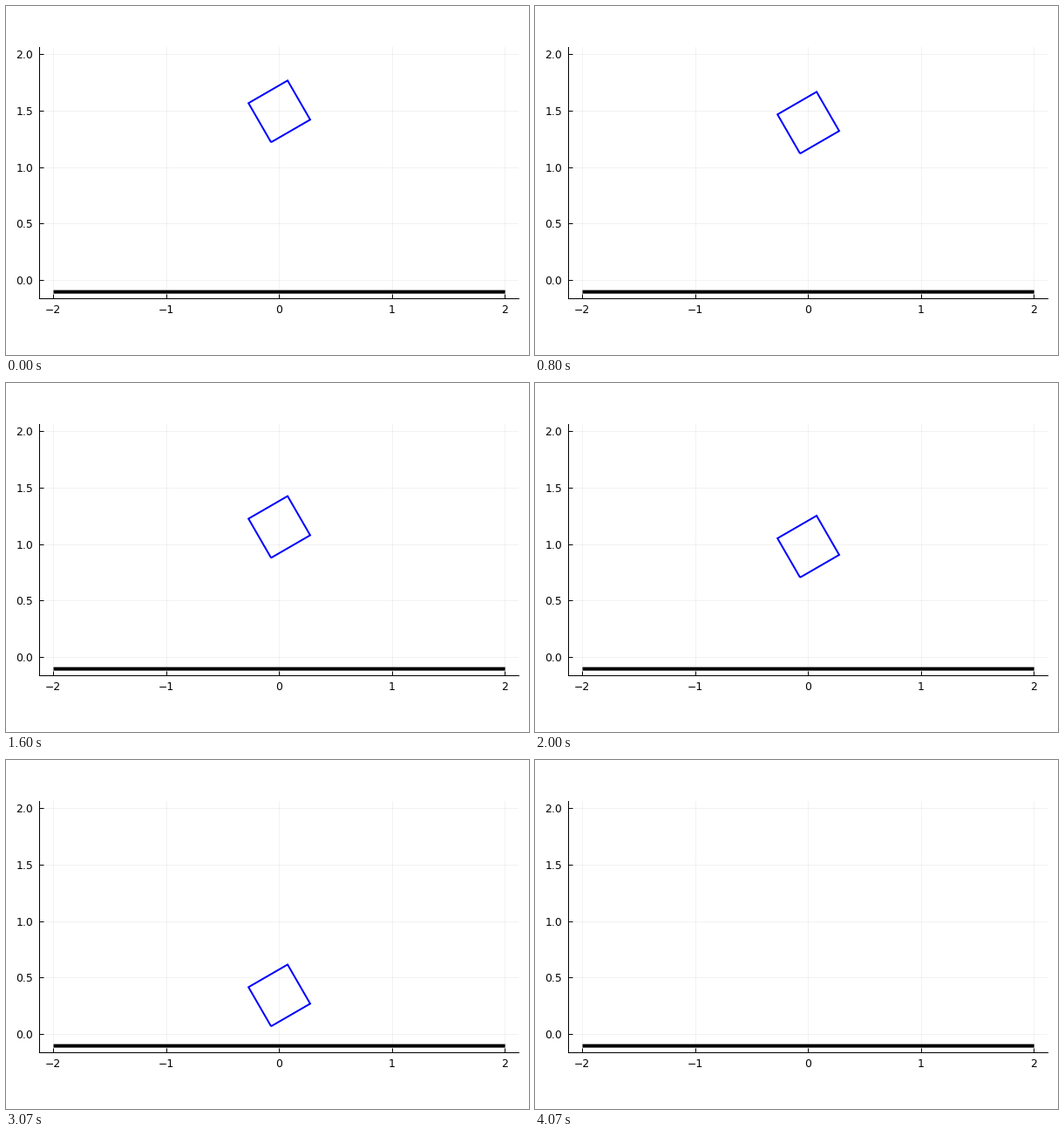
Write a matplotlib script that moves like this. It is 600 px wide and 400 px high and loops after 9.99 s.

```python
import numpy as np
import matplotlib.pyplot as plt
from matplotlib.animation import FuncAnimation

W, H, DPI = 600, 400, 100
FRAMES, LOOP_MS = 150, 9990
PT = 72 / DPI  # points per pixel

# Plot area in pixels, measured from the top left
LEFT, RIGHT, TOP, BOTTOM = 38.96, 588.19, 47.5, 335.8
X_LIM, Y_LIM = (-2.12, 2.12), (-0.163, 2.063)
X_TICKS, Y_TICKS = np.arange(-2, 3), np.arange(0, 2.1, 0.5)
HALF_PX = 0.5  # moves the frame so that its lines snap to the lower pixel

# Falling square, integrated with semi-implicit Euler steps
SIDE, TILT, START_Y, FLOOR_Y = 0.4, np.radians(30), 1.5, -0.1
GRAVITY, DT, FIRST_STEP = 9.81, 0.01, 2
CONTACT_LOSS = 0.1  # speed lost when the lowest corner meets the floor

fig = plt.figure(figsize=(W / DPI, H / DPI), dpi=DPI, facecolor="white")


def add_axes(shift=0):
    box = [(LEFT - shift) / W, 1 - (BOTTOM - shift) / H,
           (RIGHT - LEFT) / W, (BOTTOM - TOP) / H]
    return fig.add_axes(box, xlim=X_LIM, ylim=Y_LIM, facecolor="none")


def label(x, y, text, align):
    fig.text(x / W, 1 - y / H, text, ha=align, va="baseline",
             family="DejaVu Sans", size=12.4 * PT, color="black")


def to_px(value, limits, start, end):
    return start + (value - limits[0]) / (limits[1] - limits[0]) * (end - start)


frame_ax = add_axes(HALF_PX)
frame_ax.set(xticks=X_TICKS, yticks=Y_TICKS)
frame_ax.set_axisbelow(True)
frame_ax.grid(color="black", alpha=0.05, linewidth=PT)
frame_ax.tick_params(direction="in", length=5 * PT, width=PT,
                     labelbottom=False, labelleft=False)
frame_ax.spines[["top", "right"]].set_visible(False)
frame_ax.spines[["left", "bottom"]].set_linewidth(PT)

for tick in X_TICKS:
    x = to_px(tick, X_LIM, LEFT, RIGHT) - HALF_PX
    label(x, 352, str(tick).replace("-", "\u2212"), "center")
for tick in Y_TICKS:
    label(31.3, to_px(tick, Y_LIM, BOTTOM, TOP) + 4.4, f"{tick:.1f}", "right")

stage = add_axes()
stage.axis("off")
stage.plot([-2, 2], [FLOOR_Y, FLOOR_Y], color="black", linewidth=4 * PT,
           solid_capstyle="butt", snap=False)

angles = TILT + np.radians(225 + 90 * np.arange(5))
corners_x = SIDE / np.sqrt(2) * np.cos(angles)
corners_y = SIDE / np.sqrt(2) * np.sin(angles)
square, = stage.plot([], [], color="blue", linewidth=2 * PT, snap=False,
                     solid_joinstyle="miter", solid_capstyle="butt")

# Step at which the lowest corner reaches the floor
contact_drop = START_Y + corners_y.min() - FLOOR_Y
contact_step = np.sqrt(2 * contact_drop / GRAVITY) / DT - 0.5


def update(frame):
    n = frame + FIRST_STEP
    fall = GRAVITY * DT**2 * n * (n + 1) / 2
    slowed = CONTACT_LOSS * DT * max(0, n - contact_step)
    square.set_data(corners_x, corners_y + START_Y - fall + slowed)
    return square,


anim = FuncAnimation(fig, update, frames=FRAMES, interval=LOOP_MS / FRAMES,
                     repeat=True, repeat_delay=0, blit=False)
plt.show()
```
